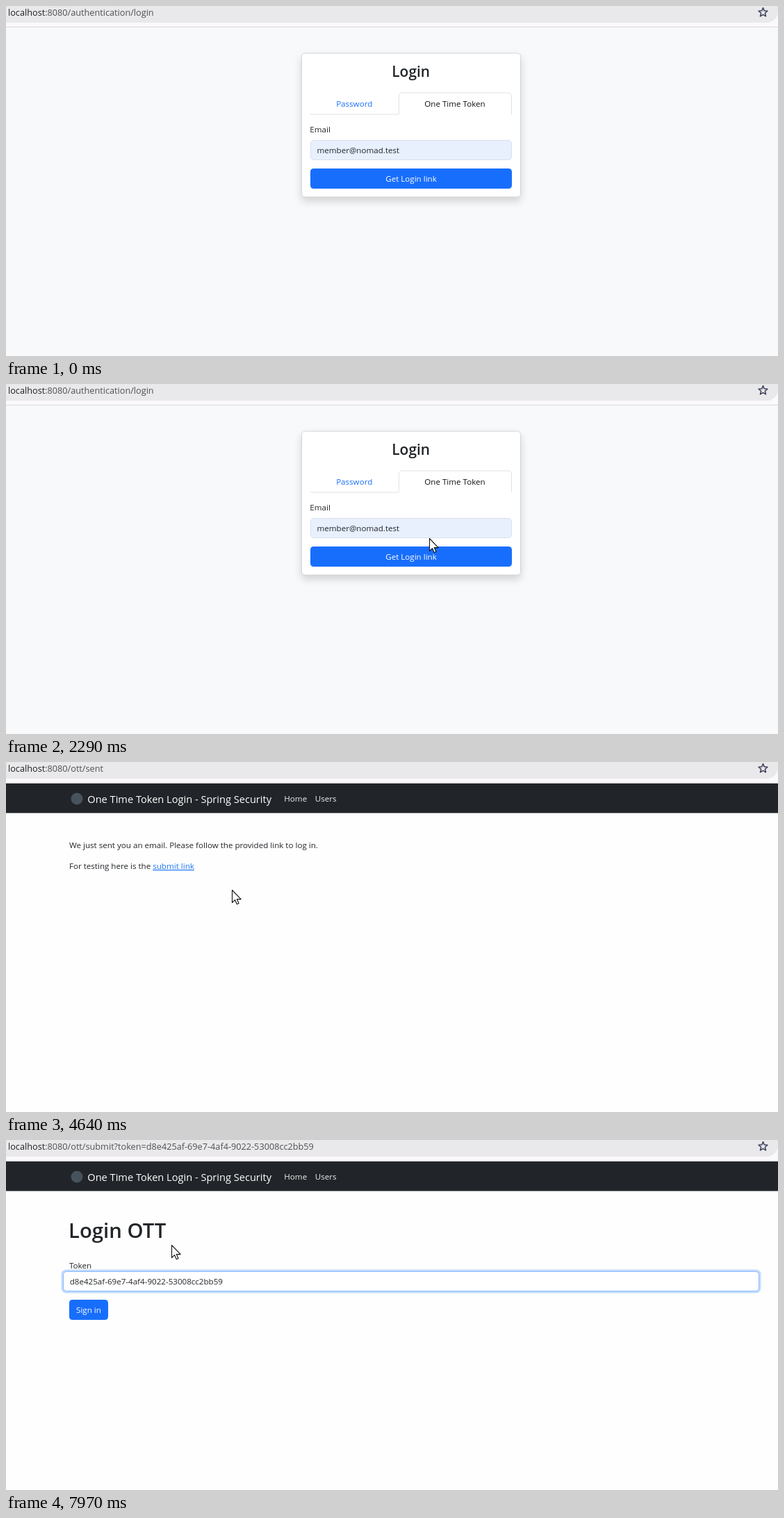
Write an HTML page that moves like this. It is 1111 by 504 pixels and loops after 8000 ms.

```html
<!DOCTYPE html>
<html lang="en">
<head>
<meta charset="utf-8">
<title>One Time Token Login</title>
<style>
html, body { margin: 0; width: 100%; height: 100%; overflow: hidden; background: #fff; }
svg { display: block; width: 100vw; height: 100vh; }
text { font: 11.6px "Open Sans", "Noto Sans", sans-serif; fill: #212529; white-space: pre; }
.url { font-size: 12.7px; fill: #505053; }
.host { fill: #1f2023; }
.mid { text-anchor: middle; }
.light { fill: #fff; }
.brand { font-size: 14.6px; }
.title { font-size: 20.9px; font-weight: 600; }
.heading { font-size: 29.3px; font-weight: 600; }
.button { fill: #186efc; }
.edge { fill: none; stroke: #dee2e6; }
.card { fill: #fff; stroke: #d3d4d6; filter: drop-shadow(0 6px 6px rgba(0, 0, 0, .15)); }
.cursor { fill: #fff; stroke: #111; stroke-width: 1.1; stroke-linejoin: round; }
</style>
</head>
<body>
<svg viewBox="0 0 1111 504">
  <rect width="1111" height="504" fill="#fefefe"/>

  <g id="loginPage">
    <rect y="30" width="1111" height="474" fill="#f8f9fb"/>
    <rect class="card" x="425.5" y="68" width="315" height="207" rx="4.6"/>
    <text class="title mid" x="582.7" y="102">Login</text>
    <path class="edge" d="M438 156H565.5V129.500q0-4.500 4.500-4.500H723q4.500 0 4.500 4.500V156"/>
    <text class="mid" x="501.2" y="145" style="fill:#186efc">Password</text>
    <text class="mid" x="646" y="145" style="fill:#111">One Time Token</text>
    <text x="437.3" y="182">Email</text>
    <rect x="438.500" y="193.500" width="289" height="28" rx="4.500" fill="#e8f0fe" stroke="#d9e0ea"/>
    <text x="447.500" y="212">member@nomad.test</text>
    <rect class="button" x="438" y="234" width="290" height="29" rx="4.600"/>
    <rect id="hover" x="438" y="234" width="290" height="29" rx="4.600"/>
    <text class="light mid" x="583" y="252.700">Get Login link</text>
  </g>

  <g id="navbar">
    <rect y="30.500" width="1111" height="43" fill="#212529"/>
    <circle cx="102" cy="53" r="8.500" fill="#46535c"/>
    <text class="brand light" x="117.300" y="58.500">One Time Token Login - Spring Security</text>
    <text x="400.300" y="57" style="fill:#f0f1f1">Home</text>
    <text x="444.800" y="57" style="fill:#f0f1f1">Users</text>
  </g>

  <g id="sentPage">
    <text x="91" y="123.700">We just sent you an email. Please follow the provided link to log in.</text>
    <text x="91" y="154">For testing here is the <tspan id="link" text-decoration="underline">submit link</tspan></text>
  </g>

  <g id="tokenPage">
    <text class="heading" x="90" y="140.700">Login OTT</text>
    <text x="91" y="184.500">Token</text>
    <rect id="glow" x="79.500" y="186.500" width="1007" height="34" rx="7" fill="#c2dbfe"/>
    <rect x="82.500" y="189.500" width="1001" height="28" rx="4.600" fill="#fff" stroke="#8bb9fc"/>
    <text x="91.700" y="207.700">d8e425af-69e7-4af4-9022-53008cc2bb59</text>
    <rect id="caret" x="92" y="195" width="1" height="16"/>
    <rect class="button" x="91" y="230" width="56" height="29" rx="4.600"/>
    <text class="light mid" x="119" y="248.800">Sign in</text>
  </g>

  <g id="addressBar">
    <rect width="1111" height="30" fill="#fbf9fb"/>
    <path d="M0 0H1111V8A16 16 0 0 1 1095 24H0Z" fill="#e9e8ea"/>
    <path d="M0 30.300H1111" stroke="#dad8dc"/>
    <text class="url" x="3" y="13.500"><tspan class="host">localhost</tspan><tspan id="path"></tspan></text>
    <path id="star" fill="none" stroke="#3d405c" stroke-width="1.500" stroke-linejoin="round"/>
  </g>

  <g id="pointer">
    <path id="arrow" class="cursor" d="M.5.500V18.500L4.600 14.700 7.300 20.800 10 19.600 7.300 13.600H13.200Z"/>
    <g id="hand" class="cursor">
      <path d="M-2 2.200C-2-.500 2-.500 2 2.200V8C2.500 6.700 5.300 6.700 5.600 9 6.200 7.800 8.500 8 8.800 10 9.600 9 11 9.600 11 11.500V16C11 20 9 23 5 23H2.500C-.500 23-1.500 21.500-3 19L-6.400 13.800C-7.400 12-5.400 10.500-4 11.900L-2 14Z"/>
      <path d="M2 7.500V12M5.600 9V12M8.800 10V12.500" fill="none"/>
    </g>
    <path id="beam" d="M-3-8H3M0-8V8M-3 8H3" stroke="#111" fill="none"/>
  </g>
  <circle id="click" r="13.500" fill="#ff0" opacity=".55"/>
</svg>

<script>
const LOOP = 8000, SENT = 3440, SUBMIT = 7450;
const $ = id => document.getElementById(id);
const clamp = v => Math.max(0, Math.min(1, v));
const within = (t, from, to) => t >= from && t < to;
const show = (id, on) => $(id).setAttribute("display", on ? "inline" : "none");

// Each move advances in equal steps; keys are [step, x, y].
const moves = [
  { from: 570, to: 1370, steps: 12, keys: [[1, 1046, 454], [4, 760, 350], [7, 600, 268], [8, 585, 235], [9, 590, 234], [12, 629, 168]] },
  { from: 1420, to: 1630, steps: 4, keys: [[1, 629, 162], [4, 631, 142]] },
  { from: 1770, to: 2550, steps: 12, keys: [[1, 633, 138], [3, 632, 128], [5, 625, 160], [8, 609, 222], [10, 604, 240], [12, 602, 243]] },
  { from: 4150, to: 4780, steps: 10, keys: [[1, 580, 239], [4, 455, 212], [8, 325, 184], [10, 327, 189]] },
  { from: 4980, to: 5590, steps: 10, keys: [[1, 320, 186], [6, 262, 158], [10, 238, 151]] }
];

function pointerAt(t) {
  const move = moves.filter(m => t >= m.from).pop();
  if (!move) return null;
  const { from, to, steps, keys } = move;
  const step = Math.min(steps, 1 + Math.floor((t - from) / (to - from) * (steps - 1) + 0.001));
  const i = Math.max(1, keys.findIndex(k => k[0] >= step));
  const [a, ax, ay] = keys[i - 1], [b, bx, by] = keys[i];
  const u = (step - a) / (b - a);
  return [ax + (bx - ax) * u, ay + (by - ay) * u];
}

function pointerShape(t, x, y) {
  if (t >= SUBMIT) return "arrow";
  if (t >= SENT) return overLink(t, x, y) ? "hand" : "arrow";
  if (t >= 3240 || x < 438 || x > 728) return "arrow";
  if (within(y, 193, 222)) return "beam";
  const onTab = within(y, 125, 156), onButton = within(y, 234, 263);
  return onTab || onButton ? "hand" : "arrow";
}

function overLink(t, x, y) {
  return within(t, SENT, SUBMIT) && within(x, 211, 270) && within(y, 143, 160);
}

const ramp = (t, start, end) => clamp((t - start) / 150) - clamp((t - end) / 150);

function render(t) {
  const page = t < SENT ? "loginPage" : t < SUBMIT ? "sentPage" : "tokenPage";
  for (const id of ["loginPage", "sentPage", "tokenPage"]) show(id, id === page);
  show("navbar", t >= SENT);
  $("path").textContent = {
    loginPage: ":8080/authentication/login",
    sentPage: ":8080/ott/sent",
    tokenPage: ":8080/ott/submit?token=d8e425af-69e7-4af4-9022-53008cc2bb59"
  }[page];

  $("hover").setAttribute("fill", within(t, 3010, 3170) ? "#1459cb" : "#155fd6");
  $("hover").setAttribute("opacity", ramp(t, 1080, 1220) + ramp(t, 2340, LOOP));
  $("glow").setAttribute("opacity", clamp(Math.floor((t - SUBMIT) / 70) / 2));
  show("caret", t < 7970);

  const tip = pointerAt(t);
  show("pointer", tip);
  if (tip) {
    const [x, y] = tip, shape = pointerShape(t, x, y);
    for (const id of ["arrow", "hand", "beam"]) show(id, id === shape);
    $("pointer").setAttribute("transform", `translate(${x} ${y})`);
    $("click").setAttribute("transform", `translate(${x - 0.5} ${y - 0.5})`);
    $("link").style.fill = overLink(t, x, y) ? "#135ccb" : "#1a75f5";
  }
  show("click", within(t, 3010, 3150) || within(t, 7180, 7250));
}

const starPoints = Array.from({ length: 10 }, (_, i) => {
  const r = i % 2 ? 3 : 6.8, a = i * Math.PI / 5;
  return `${1089.5 + r * Math.sin(a)} ${9.3 - r * Math.cos(a)}`;
});
$("star").setAttribute("d", `M${starPoints.join("L")}Z`);

const start = performance.now();
function tick() {
  render((performance.now() - start) % LOOP);
  requestAnimationFrame(tick);
}
tick();
</script>
</body>
</html>
```
